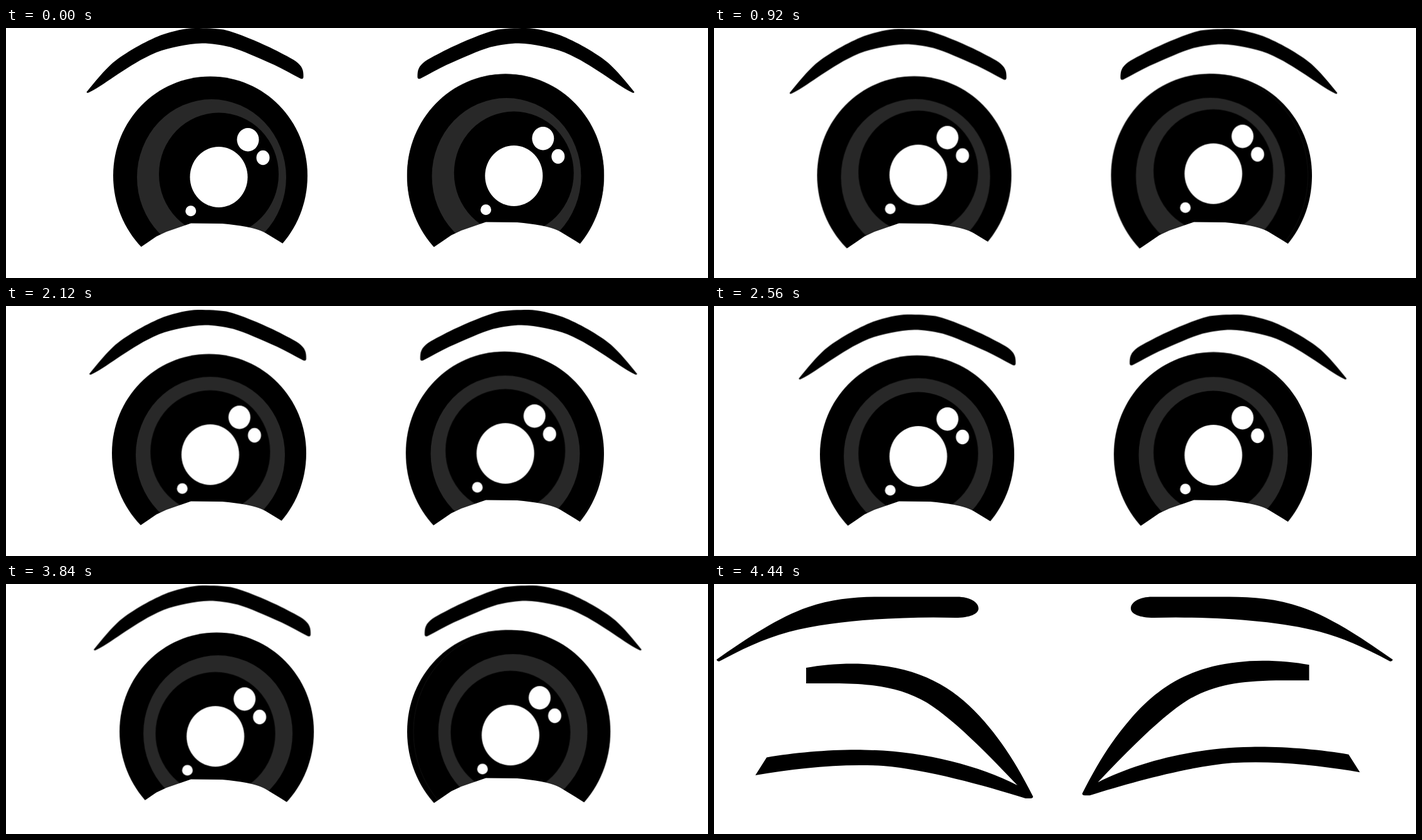
An HTML page without scripts for the animation above (4.64 s loop, 1120 px wide and 400 px high).

```html
<!DOCTYPE html>
<html lang="en">
<head>
<meta charset="utf-8">
<title>Blinking eyes</title>
<style>
  html, body { margin: 0; width: 100%; height: 100%; overflow: hidden; background: #fff; }
  svg { display: block; width: 100%; height: 100%; }

  .brow, .iris, .pupil, .open, .shut { animation: 4640ms linear infinite; }
  .brow { animation-name: brow; }
  .iris { animation-name: iris; }
  .pupil { animation-name: pupil; }
  .open { animation-name: open; animation-timing-function: step-end; }
  .shut { animation-name: shut; animation-timing-function: step-end; }
  .ring { fill: #282828; }
  .white { fill: #fff; }
  .rim { stroke: #2c2c2c; stroke-width: .4; }

  @keyframes brow {
    0% { transform: translate(0, 0); }
    12.07% { transform: translate(-7.3px, .9px); }
    15.95% { transform: translate(-9px, 1.5px); }
    19.83% { transform: translate(-8px, 1.5px); }
    24.14% { transform: translate(-6.5px, 1px); }
    35.34% { transform: translate(2.1px, -1.6px); }
    48.28% { transform: translate(5px, 8px); }
    55.17% { transform: translate(6.7px, 13.6px); }
    60.34% { transform: translate(8px, 13.6px); }
    68.97% { transform: translate(10.7px, 9.6px); }
    72.41% { transform: translate(11.2px, 7.4px); }
    82.76% { transform: translate(11.5px, 2.4px); }
    84.48% { transform: translate(10px, 2px); }
    95.69%, 100% { transform: translate(0, 0); }
  }
  @keyframes iris {
    0% { transform: translate(0, 0); }
    12.07% { transform: translate(-7px, .3px); }
    15.95% { transform: translate(-8.5px, .3px); }
    19.83% { transform: translate(-6.5px, -.4px); }
    35.34% { transform: translate(-2px, -3.2px); }
    55.17% { transform: translate(-2px, 1.5px); }
    68.97% { transform: translate(5.6px, 1.1px); }
    82.76% { transform: translate(10.2px, .1px); }
    95.69%, 100% { transform: translate(0, 0); }
  }
  @keyframes pupil {
    0% { transform: translate(0, 0); }
    15.95%, 36.2% { transform: translate(-13.6px, -3.4px); }
    55.17% { transform: translate(-13.6px, 2.1px); }
    62.93% { transform: translate(-13.6px, 4.3px); }
    68.97% { transform: translate(-11.1px, 6.1px); }
    75.86% { transform: translate(-8.4px, 7.2px); }
    82.76% { transform: translate(-5.4px, 5.3px); }
    95.69%, 100% { transform: translate(0, 0); }
  }
  @keyframes open { 0% { visibility: visible; } 95.69%, 100% { visibility: hidden; } }
  @keyframes shut { 0% { visibility: hidden; } 95.69%, 100% { visibility: visible; } }
</style>
</head>
<body>
<svg viewBox="0 0 1120 400">
  <defs>
    <path id="brow" d="M128.500 102.500C142 86 156 68.500 170 56C190 39.500 222 21.500 247 11.500C268 4.500 285 .5 302 0C318 0 336 .8 347 2.500C372 8.500 401 22 421 31C437 39 451 46 462 53C473 61 475 68 474.500 79Q474 82.500 470 81C456 74 442 65.500 428 59C402 47.500 378 36.500 358 30.500C342 27 328 24.500 313 24.500C288 25.500 262 31 240 39C215 49.500 198 61.500 179 73.500C163 84 149 95 131.500 103.500Q129 104.500 128.500 102.500Z"/>
    <path id="ball" d="M-155 0C-155-88-86-158.500 0-158.500S155-88 155 0C155 90 86 162 0 162S-155 90-155 0Z"/>
    <ellipse id="ring" class="ring" cx="328" cy="239" rx="119" ry="125"/>
    <g id="pupil">
      <ellipse cx="339.500" cy="234" rx="95.500" ry="98.500"/>
      <g class="white">
        <ellipse cx="339.500" cy="238.500" rx="46" ry="48.500"/>
        <ellipse cx="386" cy="178.700" rx="17.500" ry="18.700"/>
        <ellipse cx="410" cy="207.500" rx="10.500" ry="11.700"/>
        <circle cx="294.800" cy="292.700" r="8.500"/>
      </g>
    </g>
    <path id="lid" class="white" d="M150 402V390L190 367L213 352L240 333.500L256 326L295 312.500L345 313Q366 314.800 383 318C400 321 408 325 414 328L437 342L448 349L505 385V402Z"/>
    <path id="shutBrow" d="M4 121C53 86.500 104 52.500 150 37C188 23.500 228 20.500 265 20.500H388C408 20.500 422 29 422 39C422 48 408 54 385 54L350 53.500C270 54 185 59.500 120 76.500C76 88.500 42 106 9 123.500Q5 124.500 4 121Z"/>
    <path id="shutEye" d="M147 134C180 128 225 125 262 130C340 138 391 173 431 219.500C465 259 486 295 509 340Q509 343 505 343H497C430 322 340 297 270 291C200 287 130 295 66 306L84 277.500C130 269.500 190 264.500 240 265.500C330 266.500 420 289.500 484 322C430 265 380 215 340 190C300 167 260 160 200 159H147Z"/>
  </defs>

  <g class="open">
    <!-- left eye -->
    <g class="iris">
      <use href="#ball" x="326" y="236"/>
      <use href="#ring"/>
    </g>
    <g class="pupil"><use href="#pupil"/></g>
    <use href="#lid"/>

    <!-- right eye, with a still disc behind the moving one -->
    <use href="#ball" transform="translate(797 236) scale(1.013 1.023)"/>
    <g class="iris">
      <use href="#ball" class="rim" transform="translate(797 236) scale(1.013 1.023)"/>
      <use href="#ring" x="470.500" y="-2"/>
    </g>
    <g class="pupil"><use href="#pupil" x="470.800" y="-2"/></g>
    <use href="#lid" x="470.500" y="-2"/>

    <g class="brow">
      <use href="#brow"/>
      <use href="#brow" transform="translate(1131) scale(-1 1)"/>
    </g>
  </g>

  <g class="shut">
    <use href="#shutBrow"/>
    <use href="#shutBrow" transform="translate(1087) scale(-1 1)"/>
    <use href="#shutEye"/>
    <use href="#shutEye" transform="translate(1096.500 -4.800) scale(-1 1)"/>
  </g>
</svg>
</body>
</html>
```
